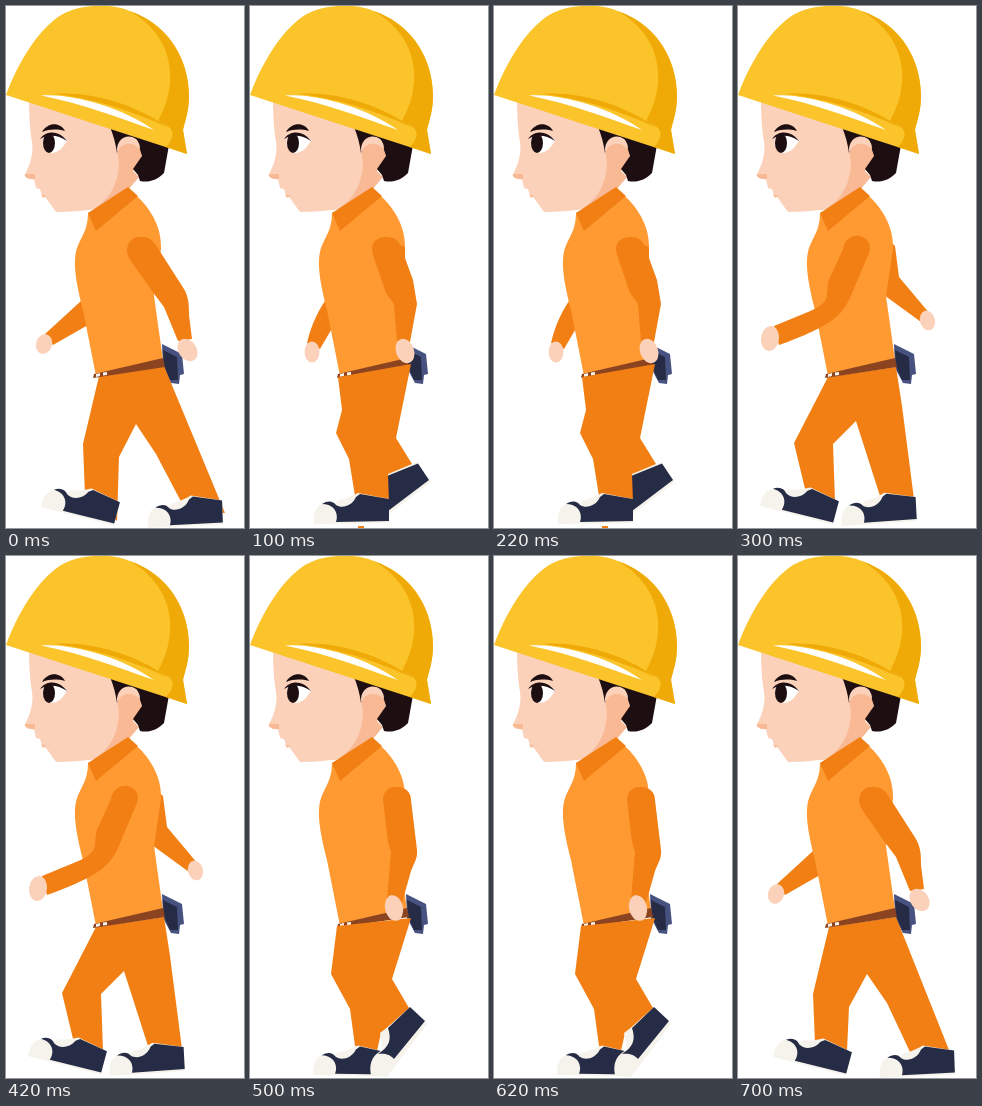
Recreate the animation shown at these times as an HTML page. Size 238x522 px, loop 0.8 s.

```html
<!DOCTYPE html>
<html lang="en">
<head>
<meta charset="utf-8">
<title>Walking worker</title>
<style>
  html, body { margin: 0; width: 100%; height: 100%; overflow: hidden; background: #fff; }
  svg { display: block; width: 238px; height: 522px; }
  .trouser, .sleeve { fill: #f27f13; }
  .shirt { fill: #ff9a33; }
  .skin { fill: #fbd1ba; }
  .shade { fill: #f9b994; }
  .navy { fill: #262c45; }
  .white { fill: #f5f3eb; }
  .hair { fill: #1d0e12; }
  .belt { fill: #8c4420; }
  .gold { fill: #fac42a; }
  .amber { fill: #f0aa07; }

  /* Each pose holds, then cuts to the next one. */
  .reach, .pass, .swing, .close, .settle, .stride { visibility: hidden; animation: 800ms step-end infinite; }
  .reach { animation-name: reach; }
  .pass { animation-name: pass; }
  .swing { animation-name: swing; }
  .close { animation-name: close; }
  .settle { animation-name: settle; }
  .stride { animation-name: stride; }
  @keyframes reach { 0% { visibility: visible } 12.5%, 100% { visibility: hidden } }
  @keyframes pass { 0% { visibility: hidden } 12.5% { visibility: visible } 37.5%, 100% { visibility: hidden } }
  @keyframes swing { 0% { visibility: hidden } 37.5% { visibility: visible } 62.5%, 100% { visibility: hidden } }
  @keyframes close { 0% { visibility: hidden } 62.5% { visibility: visible } 87.5%, 100% { visibility: hidden } }
  @keyframes settle { 0% { visibility: hidden } 87.5%, 100% { visibility: visible } }
  @keyframes stride { 0% { visibility: visible } 12.5% { visibility: hidden } 87.5%, 100% { visibility: visible } }
</style>
</head>
<body>
<svg viewBox="0 0 238 522">
  <defs>
    <g id="shoe">
      <path class="white" d="M0 0C-1 -11 3 -19 9 -20C15 -23 19 -23 22 -21L25 -24C32 -25 38 -28 44 -31L75 -25V-1Z"/>
      <path class="navy" d="M8 -20C14 -24 19 -23 22 -19C28 -15 38 -18 42 -27L46 -30L75 -25V-3L22 -2C25 -11 20 -20 8 -20Z"/>
    </g>
    <g id="strap">
      <path class="belt" d="M88 368L157 352L159 361L87 372Z"/>
      <path class="white" d="M90 368L94 367V370L90 371ZM97 366.500L101 366V369L97 369.500Z"/>
    </g>
  </defs>

  <!-- far arm -->
  <g class="stride">
    <path class="sleeve" d="M75 295L39 328L47 339L82 319Z"/>
    <ellipse class="skin" cx="38" cy="338" rx="8" ry="10" transform="rotate(18 38 338)"/>
  </g>
  <g class="pass">
    <path class="sleeve" d="M75 295C65 310 60 324 57 337L70 343L84 319Z"/>
    <ellipse class="skin" cx="62" cy="346" rx="7.500" ry="10.500"/>
  </g>
  <g class="swing">
    <path class="sleeve" d="M152 235L157 240L161 271L189.500 305L183 316L146 289Z"/>
    <ellipse class="skin" cx="189.500" cy="314.500" rx="7.500" ry="10" transform="rotate(-15 189.500 314.500)"/>
  </g>

  <!-- torso and pouch -->
  <path fill="#475280" d="M156 338L176 348L178 368L174 369L173 378L165 377L157 362Z"/>
  <path class="navy" d="M157 344L171 351L172 374L164 374L158 360Z"/>
  <path class="shirt" d="M82 207L126 186C144 200 156 221 155 243L148 290L157 354L90 370L77 304C71 280 66 257 71 242C75 231 82 224 82 207Z"/>

  <!-- legs -->
  <g class="reach">
    <path class="trouser" d="M93 370L158 360L219 507L180 505L150 448L130 418L113 451L111 515L79 490L77 438Z"/>
    <use href="#strap"/>
    <use href="#shoe" transform="translate(35 501) rotate(15)"/>
    <use href="#shoe" transform="translate(142 522) rotate(-2)"/>
  </g>
  <g class="pass">
    <use href="#strap"/>
    <path class="white" d="M137 467L167 456L181 476L139 508H130Z"/>
    <path class="navy" d="M137 470L168 457.500L179 474L138 505Z"/>
    <path class="trouser" d="M88 371L161 358L146 432L162 458L138 468L139 496L105 490L99 453L86 427L92 404Z"/>
    <path class="trouser" d="M108 520H114V522H108Z"/>
    <use href="#shoe" transform="translate(64 518)"/>
  </g>
  <g class="swing">
    <path class="trouser" d="M90 371L158 361L164 400L176 493L142 490L118 415L95 438L97 495L68 487L56 437Z"/>
    <use href="#strap"/>
    <use href="#shoe" transform="translate(22 500) rotate(15)"/>
    <use href="#shoe" transform="translate(104 520) rotate(-3)"/>
  </g>
  <g class="close">
    <use href="#strap"/>
    <path class="trouser" d="M87 370L161 362L142 423L159 452L131 477L127 495L105 490L100 453L81 418Z"/>
    <use href="#shoe" transform="translate(63 519) rotate(2)"/>
    <path class="white" d="M121 519C118 505 125 497 133 494L130 477L138 471L176 466L177 468L137 521Z"/>
    <path class="navy" d="M128 498C139 491 142 484 138 472L160 451L175 465L144 503C140 498 134 497 128 498Z"/>
  </g>
  <g class="settle">
    <path class="trouser" d="M91 371L158 361L211 494L172 496L149 447L129 418L111 451L109 495L77 487L75 438Z"/>
    <use href="#strap"/>
    <use href="#shoe" transform="translate(35 501) rotate(15)"/>
    <use href="#shoe" transform="translate(142 522) rotate(-2)"/>
  </g>

  <!-- near arm -->
  <g class="stride">
    <path class="sleeve" d="M121 244C122 233 130 230 137 231C145 231 149 237 153 244L178 283C183 292 183 300 183 309L186 333L172 335L158 301L146 285L125 255Q121 249 121 244Z"/>
    <ellipse class="skin" cx="181.500" cy="344" rx="9" ry="12" transform="rotate(-35 181.500 344)"/>
  </g>
  <g class="pass">
    <path class="sleeve" d="M122 244C122 233 130 231 137 231C145 231 148 235 150 239L155 241L155 252L163 274L167 298L160 336L147 335L144 298L136 287L124 252Z"/>
    <ellipse class="skin" cx="155" cy="345" rx="9" ry="12.500" transform="rotate(-20 155 345)"/>
  </g>
  <g class="swing">
    <path class="sleeve" d="M105 243C107 232 115 229 122 230C130 232 134 239 131 247L117 280C112 293 107 304 97 312C86 321 66 330 41 339L36 320L70 306C85 300 89 294 89 288L90 276Z"/>
    <ellipse class="skin" cx="32" cy="332.500" rx="9" ry="12.500" transform="rotate(8 32 332.500)"/>
  </g>
  <g class="close">
    <path class="sleeve" d="M133 244C133 234 141 230 148 231C157 232 161 237 161 244L167 294C168 302 164 307 161 315L152 347L137 344L141 296L138 286Z"/>
    <ellipse class="skin" cx="144" cy="352" rx="9" ry="13" transform="rotate(-12 144 352)"/>
  </g>

  <!-- head -->
  <path class="shade" d="M108 130L134 138L136 152L127 165L133 171L122 184C112 197 100 202 80 204Z"/>
  <path class="skin" d="M23 94L112 122C109 135 112 146 113 158C112 178 104 193 88 203C77 205 64 206 50 206L40 192L36 189L34 183L30 182L28 173C22 173 18 171 19 168C23 161 28 148 26 136C24 125 23 111 23 94Z"/>
  <path class="shade" d="M19 168L29 168V173C23 174 18 171 19 168ZM35 188L40 190L37 192Z"/>
  <path class="hair" d="M104 121L163 139L158 167C151 174 143 177 134 175L132 169L127 163L136 150L131 134C123 128 114 133 111 147Q109 133 104 121Z"/>
  <path class="skin" d="M111 146C110 132 122 127 130 133Q134 137 134 143C126 135 116 136 111 146Z"/>
  <path class="hair" d="M36 126C42 116 54 116 59 125C51 123 44 123 36 126Z"/>
  <path fill="#fff" d="M37 132C43 126 53 126 61 134C57 143 51 147 45 147C39 146 36 140 37 132Z"/>
  <ellipse class="hair" cx="43" cy="137" rx="6" ry="10"/>
  <path class="hair" d="M34 133C40 124 53 124 61 135C52 129 43 128 34 133Z"/>
  <path class="sleeve" d="M82 207L122 181L132 190L90 225Z"/>

  <!-- helmet -->
  <path class="gold" d="M0 89C15 49 36 21 55 9C76 -3 110 -3 128 7C164 20 183 55 183 90C183 105 179 115 177 124L181 148Z"/>
  <path class="amber" d="M124 5C163 19 183 54 183 90C183 105 179 115 177 124L181 148L160 141L164 136C168 129 167 125 163 121L152 115C172 80 171 33 124 5Z"/>
  <path class="amber" d="M48 88C85 85 125 98 152 115L163 122C125 104 85 92 48 88Z"/>
  <path fill="#fff" d="M35 89.500C65 87 116 101 148 124C113 112 78 98 35 89.500Z"/>
</svg>
</body>
</html>
```
